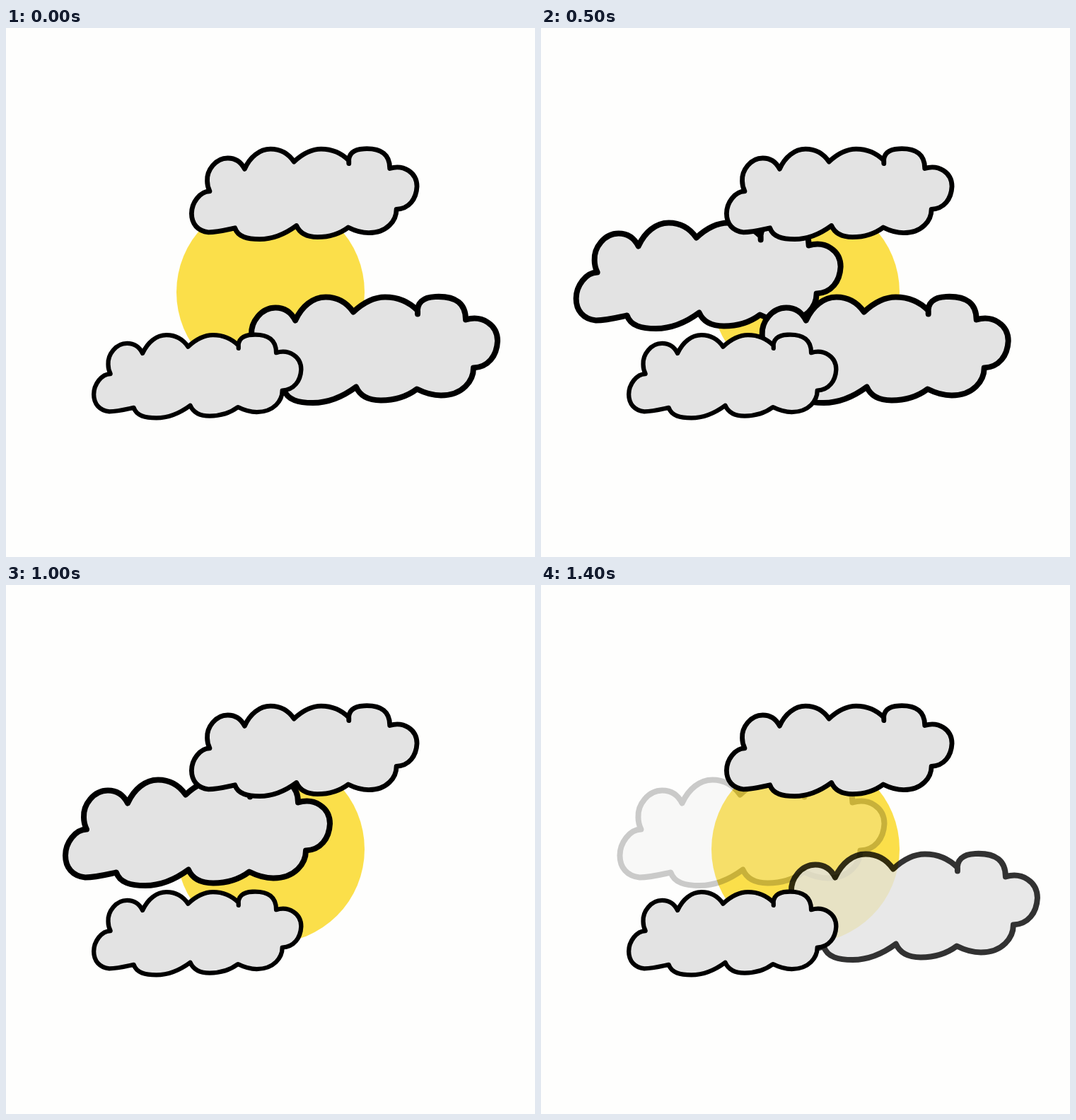
An HTML page with a canvas for the animation above (1.5 s loop, 748 px wide and 748 px high).

```html
<!DOCTYPE html>
<html lang="en">
<head>
<meta charset="utf-8">
<title>Drifting clouds</title>
<style>
  html, body { margin: 0; width: 100%; height: 100%; overflow: hidden; background: #fefefd; }
  canvas { display: block; width: 100vw; height: 100vh; }
</style>
</head>
<body>
<canvas id="stage" width="748" height="748"></canvas>
<script>
const SIZE = 748, STEP = 100, STEPS = 15, FADE = 5, DRIFT = 6.87;

const ctx = document.getElementById('stage').getContext('2d');
const layer = document.createElement('canvas');
layer.width = layer.height = SIZE;
const layerCtx = layer.getContext('2d');

// Cloud outline, clockwise from the left notch, in a 382 x 157 box.
const cloudPath = new Path2D(`
  M34 74 C32 70 30 65 30 57 C29 39 44 19 64 19 C76 19 86 25 92 37
  C101 17 117 4 135 4 C152 4 165 12 174 25
  C188 12 203 4 219 4 C238 4 252 10 265 23 L265 28
  C263 12 273 4 290 3.5 C320 2 333 14 333 36
  C356 29 378 43 378 66 C377 87 365 103 344 104
  C344 122 329 143 298 143 C287 143 276 140 264 134
  C252 143 234 150 213 150 C196 150 184 145 178 131
  C159 145 139 153.5 117 153.5 C97 153.5 81 150 76 135
  C62 138 47 142 32 142 C14 140 4 128 4 111 C4 93 18 74 34 74 Z`);

function drawCloud(c, x, y, scale) {
  c.save();
  c.translate(x, y);
  c.scale(scale, scale);
  c.lineWidth = 8;
  c.lineJoin = c.lineCap = 'round';
  c.fillStyle = '#e3e3e3';
  c.strokeStyle = '#000';
  c.fill(cloudPath);
  c.stroke(cloudPath);
  c.restore();
}

// The cloud fades as one piece, so its fill never shows through its line.
function drawFadingCloud(x, y, age) {
  const alpha = Math.min(1, age / FADE, (STEPS - age) / FADE);
  layerCtx.clearRect(0, 0, SIZE, SIZE);
  drawCloud(layerCtx, x, y, 1);
  ctx.globalAlpha = alpha;
  ctx.drawImage(layer, 0, 0);
  ctx.globalAlpha = 1;
}

function drawSun() {
  ctx.fillStyle = '#fbdf4a';
  ctx.beginPath();
  ctx.arc(374, 373.5, 133, 0, Math.PI * 2);
  ctx.fill();
}

function render(time) {
  const leftAge = Math.floor(time / STEP) % STEPS;
  const rightAge = (leftAge + 5) % STEPS;

  ctx.fillStyle = '#fefefd';
  ctx.fillRect(0, 0, SIZE, SIZE);
  drawSun();
  drawFadingCloud(11.3 + DRIFT * leftAge, 271.5, leftAge);
  drawFadingCloud(351.4 - DRIFT * rightAge, 376.5, rightAge);
  drawCloud(ctx, 259, 167.8, 0.852);
  drawCloud(ctx, 121, 431, 0.784);
}

function tick(time) {
  render(time);
  requestAnimationFrame(tick);
}

render(0);
requestAnimationFrame(tick);
</script>
</body>
</html>
```
